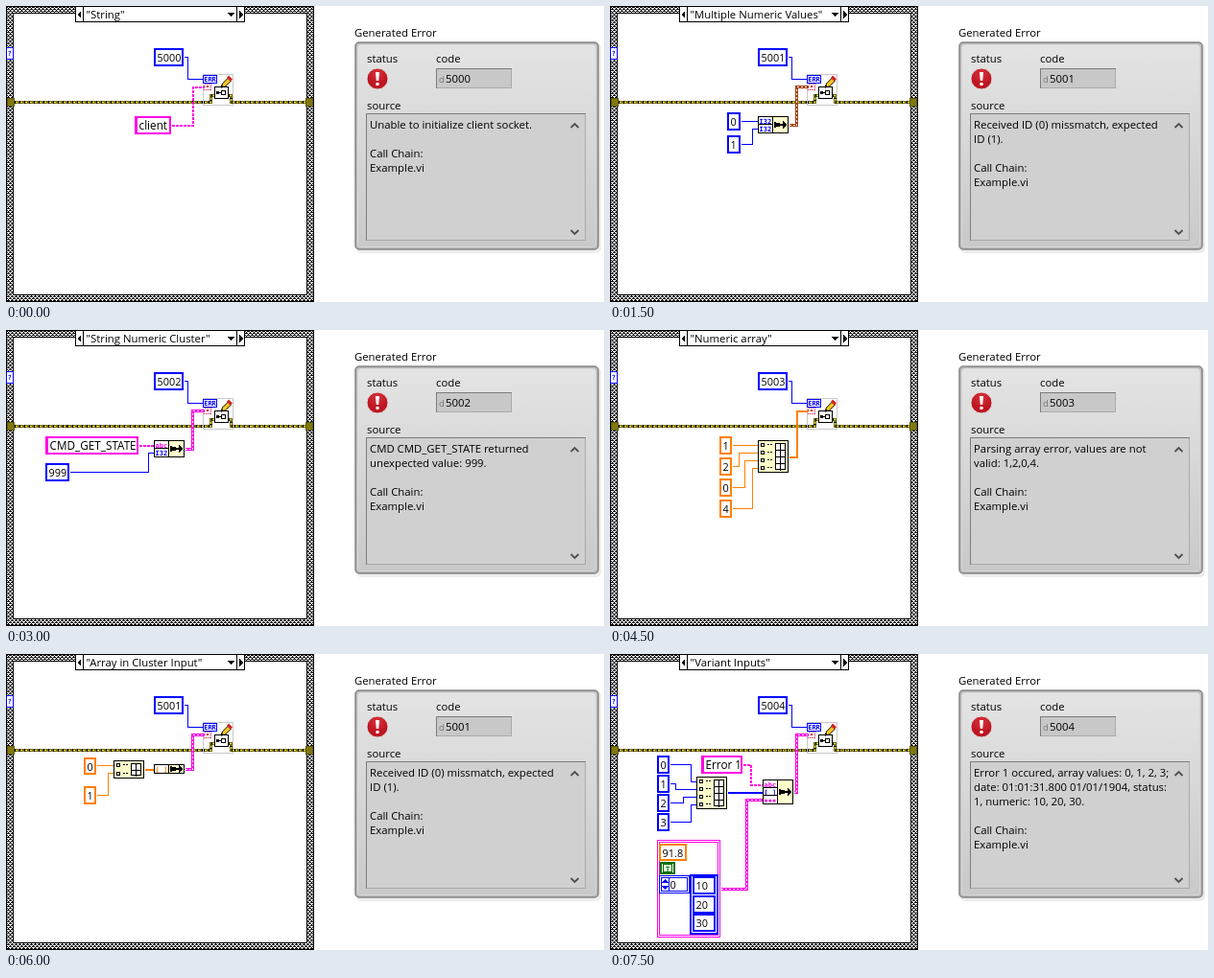
An HTML page that plays this animation: 623 px wide and 309 px high, repeating every 9 s.

```html
<!DOCTYPE html>
<html lang="en">
<head>
<meta charset="utf-8">
<title>Error generator inputs</title>
<style>
  html, body { margin: 0; width: 100%; height: 100%; overflow: hidden; background: #fff; }
  svg { display: block; font: 11.35px "Open Sans", "Noto Sans", sans-serif; shape-rendering: crispEdges; }
  text { white-space: pre; }
  .tiny { font: bold 7px "DejaVu Sans Mono", monospace; }
  .smooth { shape-rendering: geometricPrecision; }
</style>
</head>
<body>
<svg id="stage" width="623" height="309" viewBox="0 0 623 309">
  <defs>
    <pattern id="hatch" width="4" height="4" patternUnits="userSpaceOnUse">
      <rect width="4" height="4" fill="#fff"/>
      <path d="M0 0h1v2h-1zM1 1h1v1h-1zM3 1h1v1h-1zM2 2h1v2h-1zM1 3h1v1h-1zM3 3h1v1h-1z"/>
    </pattern>
    <linearGradient id="panel" x2="0" y2="1">
      <stop stop-color="#e4e4e4"/><stop offset="1" stop-color="#c9c9c9"/>
    </linearGradient>
    <radialGradient id="red" cy=".25">
      <stop stop-color="#d8343e"/><stop offset="1" stop-color="#bd1622"/>
    </radialGradient>
  </defs>
  <g id="diagram"></g>
  <g id="scene"></g>
</svg>
<script>
const BLUE = '#0000ff', PINK = '#ff00e6', ORANGE = '#ff8000', BROWN = '#a04010', GREEN = '#007000', CREAM = '#ffffcc';
const HOLD = 1500;

const rect = (x, y, w, h, fill, extra = '') =>
  `<rect x="${x}" y="${y}" width="${w}" height="${h}" fill="${fill}" ${extra}/>`;
const frame = (x, y, w, h, color, width = 1, fill = '#fff') =>
  rect(x + width / 2, y + width / 2, w - width, h - width, fill, `stroke="${color}" stroke-width="${width}"`);
const label = (x, y, s, color = '#000', extra = '') =>
  `<text x="${x}" y="${y}" fill="${color}" ${extra}>${s}</text>`;
const shape = (d, fill, extra = '') => `<path d="${d}" fill="${fill}" ${extra}/>`;
const line = (d, color, width = 1, dash = '') =>
  `<path d="${d}" fill="none" stroke="${color}" stroke-width="${width}" stroke-dasharray="${dash}" transform="translate(.5 .5)"/>`;

const stringWire = d => line(d, PINK, 2, '3 1');
const clusterWire = (d, color = PINK) => line(d, color, 3) + line(d, '#fff', 1, '2 2');
const errorWire = d => line(d, '#77700c', 3) + line(d, '#f4e23c', 1, '3 2') + line(d, '#000', 3, '1 4');

const constant = (x, y, w, h, color, s) =>
  frame(x, y, w, h, color, 2) + label(x + 3.6, y + h / 2 + 4.5, s, '#000', 'font-size="10.9"');
const stringConstant = (x, y, w, h, s) =>
  frame(x, y, w, h, PINK, 2) + rect(x + 2, y + 2, 1, h - 4, PINK) +
  label(x + 4.6, y + h / 2 + 4.5, s, '#000', 'font-size="11.7"');

function bundle(x, y, types) {
  const h = types.length * 8 + 2, m = y + h / 2;
  const cells = types.map(([s, color], i) =>
    frame(x, y + i * 8, 16, 10, '#000') +
    label(x + 1.5, y + i * 8 + 7.5, s, color, 'class="tiny"')).join('');
  return frame(x, y, 32, h, '#000', 1, CREAM) + cells +
    rect(x + 17, m - 3, 2, 6, '#000') + rect(x + 19, m - 2, 4, 4, '#000') +
    shape(`M${x + 23} ${m - 1}h3v-3l4 4l-4 4v-3h-3z`, '#000');
}

function buildArray(x, y, h, rows) {
  const step = (h - 2) / rows;
  let s = frame(x, y, 32, h, '#000', 1, CREAM);
  for (let i = 0; i < rows; i++) {
    const c = Math.round(y + step * (i + .5));
    s += frame(x + 3, c - 1, 4, 4, '#000') + line(`M${x + 9} ${c}h6`, '#000', 1, '2 1');
  }
  s += frame(x + 18, y + 3, 11, h - 6, '#000') + line(`M${x + 23} ${y + 3}v${h - 6}`, '#000');
  for (let i = 1; i < rows; i++) s += line(`M${x + 18} ${Math.round(y + 3 + (h - 6) * i / rows)}h10`, '#000');
  return s;
}

// Sunken field: dark top and left edges, light bottom and right edges.
const field = (x, y, w, h, fill) =>
  rect(x, y, w, h, fill) + line(`M${x} ${y + h - 1}V${y}H${x + w - 1}`, '#7c7c7c') +
  line(`M${x} ${y + h - 1}H${x + w - 1}V${y}`, '#aaa');

function errorPanel() {
  return label(363, 32, 'Generated Error') +
    `<g class="smooth">` +
    rect(365, 39, 255, 219, '#ececec', 'rx="5"') +
    rect(364, 38, 253, 216, '#bcbcbc', 'rx="4" stroke="#858585" stroke-width="1.5"') +
    rect(366.5, 40.5, 248, 211, 'url(#panel)', 'rx="3" stroke="#d8d8d8"') +
    `<circle cx="387" cy="76" r="11" fill="url(#red)" stroke="#ddd"/>` +
    shape('M385 69h4l-.8 9h-2.4z', '#fff') + `<circle cx="387" cy="81.5" r="1.8" fill="#fff"/></g>` +
    label(376, 59, 'status') + label(448, 59, 'code') + label(376, 108, 'source') +
    field(448, 65, 79, 21, '#c8c8c8') +
    label(451, 80, 'd', '#777', 'font-size="9.5"') +
    field(375, 112, 229, 133, '#d0d0d0') +
    `<g class="smooth" fill="none" stroke="#505050" stroke-width="1.8">` +
    `<path d="M588.5 127l4-4l4 4M588.5 234l4 4l4-4"/></g>`;
}

function errorNode() {
  return frame(205, 71, 32, 33, '#c8c8c8') +
    frame(205, 72, 15, 9, BLUE) + label(206.2, 79, 'ERR', BLUE, 'class="tiny"') +
    rect(206.5, 81.5, 7, 6, '#fff', 'stroke="#c00040" stroke-dasharray="1 1"') +
    rect(209, 83, 2, 2, '#d00000') +
    errorWire('M205 100H213V93H217') + errorWire('M231 93H234V100H237') +
    frame(217, 84, 15, 13, '#000') + rect(219, 89, 3, 3, '#000') + rect(222, 90, 2, 1, '#000') +
    frame(224, 88, 5, 5, '#000') +
    `<g class="smooth">` + shape('M224 85l1.5-4l6-6l3 3l-6 6z', '#ffc820', 'stroke="#000"') +
    shape('M230 75l2-2.5l4 4l-2.5 2z', '#d02020') + shape('M224 85.5l1-3l2 2z', '#000') + `</g>`;
}

function structure() {
  return frame(0, 0, 321, 309, '#000', 1, 'url(#hatch)') + frame(7, 7, 307, 295, '#000') +
    frame(72, 0, 177, 17, '#000') + line('M80 0V16M240 0V16', '#000') +
    shape('M78 5v8l-4-4zM243 5v8l4-4zM231 7h7l-3.5 4z', '#000') +
    frame(0, 43, 8, 13, BLUE) + label(1.8, 52, '?', BLUE, 'class="tiny"') +
    errorWire('M8 100H313') +
    frame(1, 96, 8, 9, '#5c5808', 1, '#80780c') + frame(312, 96, 8, 9, '#5c5808', 1, '#80780c') +
    line('M185 53H189V76H205', BLUE) + errorNode();
}

const I32 = ['I32', BLUE], ABC = ['abc', PINK];
const CALL_CHAIN = ['', 'Call Chain:', 'Example.vi'];
const MISMATCH = ['Received ID (0) missmatch, expected', 'ID (1).'];

const variantInputs = () =>
  [0, 1, 2, 3].map(n => constant(49, 106 + n * 20, 13, 19, BLUE, n)).join('') +
  line('M62 115H84V133H90M62 135H68V141H90M62 155H76V149H90M62 175H84V157H90', BLUE) +
  buildArray(90, 128, 34, 4) + line('M122 144H159', BLUE, 2) +
  stringConstant(95, 106, 43, 19, 'Error 1') + stringWire('M138 115H146V136H159') +
  clusterWire('M115 245H142V152H159') +
  bundle(159, 131, [ABC, ['[ ]', BLUE], ['▪▪▪', PINK]]) + clusterWire('M191 144H194V84H206') +
  frame(49, 194, 66, 102, PINK) + frame(51, 196, 62, 98, PINK) +
  constant(51, 198, 29, 18, ORANGE, '91.8') +
  frame(52, 217, 16, 13, GREEN, 2) + frame(55, 219, 10, 9, GREEN, 1, '#e8ffe8') +
  label(57.9, 226.5, 'T', GREEN, 'class="tiny"') +
  frame(51, 231, 32, 19, BLUE) + frame(53, 233, 28, 15, BLUE) + line('M61 233v14', BLUE) +
  shape('M54 239h7l-3.5-4zM54 242h7l-3.5 4z', BLUE) + label(62.6, 245, '0', '#000', 'font-size="10.9"') +
  frame(83, 230, 30, 63, BLUE, 2) +
  [10, 20, 30].map((n, i) => constant(86, 232 + i * 19.5, 24, 19, BLUE, n)).join('');

const scenes = [
  { title: 'String', code: 5000, message: ['Unable to initialize client socket.'],
    draw: () => stringWire('M172 124H194V84H206') + stringConstant(134, 115, 38, 19, 'client') },
  { title: 'Multiple Numeric Values', code: 5001, message: MISMATCH,
    draw: () => constant(122, 111, 14, 19, BLUE, 0) + constant(122, 135, 14, 19, BLUE, 1) +
      line('M136 120H154M136 144H148V128H154', BLUE) +
      bundle(154, 115, [I32, I32]) + clusterWire('M186 124H194V84H206', BROWN) },
  { title: 'String Numeric Cluster', code: 5002,
    message: ['CMD CMD_GET_STATE returned', 'unexpected value: 999.'],
    draw: () => stringConstant(41, 111, 97, 19, 'CMD_GET_STATE') + constant(41, 139, 25, 19, BLUE, 999) +
      stringWire('M138 120H154') + line('M66 148H148V128H154', BLUE) +
      bundle(154, 115, [ABC, I32]) + clusterWire('M186 124H194V84H206') },
  { title: 'Numeric array', code: 5003, message: ['Parsing array error, values are not', 'valid: 1,2,0,4.'],
    draw: () => [1, 2, 0, 4].map((n, i) => constant(114, 111 + i * 22, 13, 19, ORANGE, n)).join('') +
      line('M127 120H154M127 142H134V128H154M127 164H140V136H154M127 186H148V144H154', ORANGE) +
      buildArray(154, 115, 34, 4) + line('M186 132H194V84H206', ORANGE, 2) },
  { title: 'Array in Cluster Input', code: 5001, message: MISMATCH,
    draw: () => constant(81, 108, 13, 18, ORANGE, 0) + constant(81, 138, 13, 19, ORANGE, 1) +
      line('M94 116H113M94 147H106V124H113', ORANGE) +
      buildArray(112, 111, 19, 2) + line('M144 120H154', ORANGE, 2) +
      bundle(154, 115, [['[ ]', ORANGE]]) + clusterWire('M186 120H194V84H206') },
  { title: 'Variant Inputs', code: 5004,
    message: ['Error 1 occured, array values: 0, 1, 2, 3;', 'date: 01:01:31.800 01/01/1904, status:', '1, numeric: 10, 20, 30.'],
    draw: variantInputs },
];

const renderScene = ({ title, code, message, draw }) =>
  label(83.5, 13, `"${title}"`) + constant(154, 44, 31, 19, BLUE, code) + draw() + label(458, 80, code) +
  [...message, ...CALL_CHAIN].map((s, i) => label(379, 128 + i * 15, s)).join('');

const sceneLayer = document.getElementById('scene');
document.getElementById('diagram').innerHTML = structure() + errorPanel();

const start = performance.now();
let current = -1;
function tick() {
  const index = Math.floor((performance.now() - start) / HOLD) % scenes.length;
  if (index !== current) {
    current = index;
    sceneLayer.innerHTML = renderScene(scenes[index]);
  }
  requestAnimationFrame(tick);
}
tick();
</script>
</body>
</html>
```
